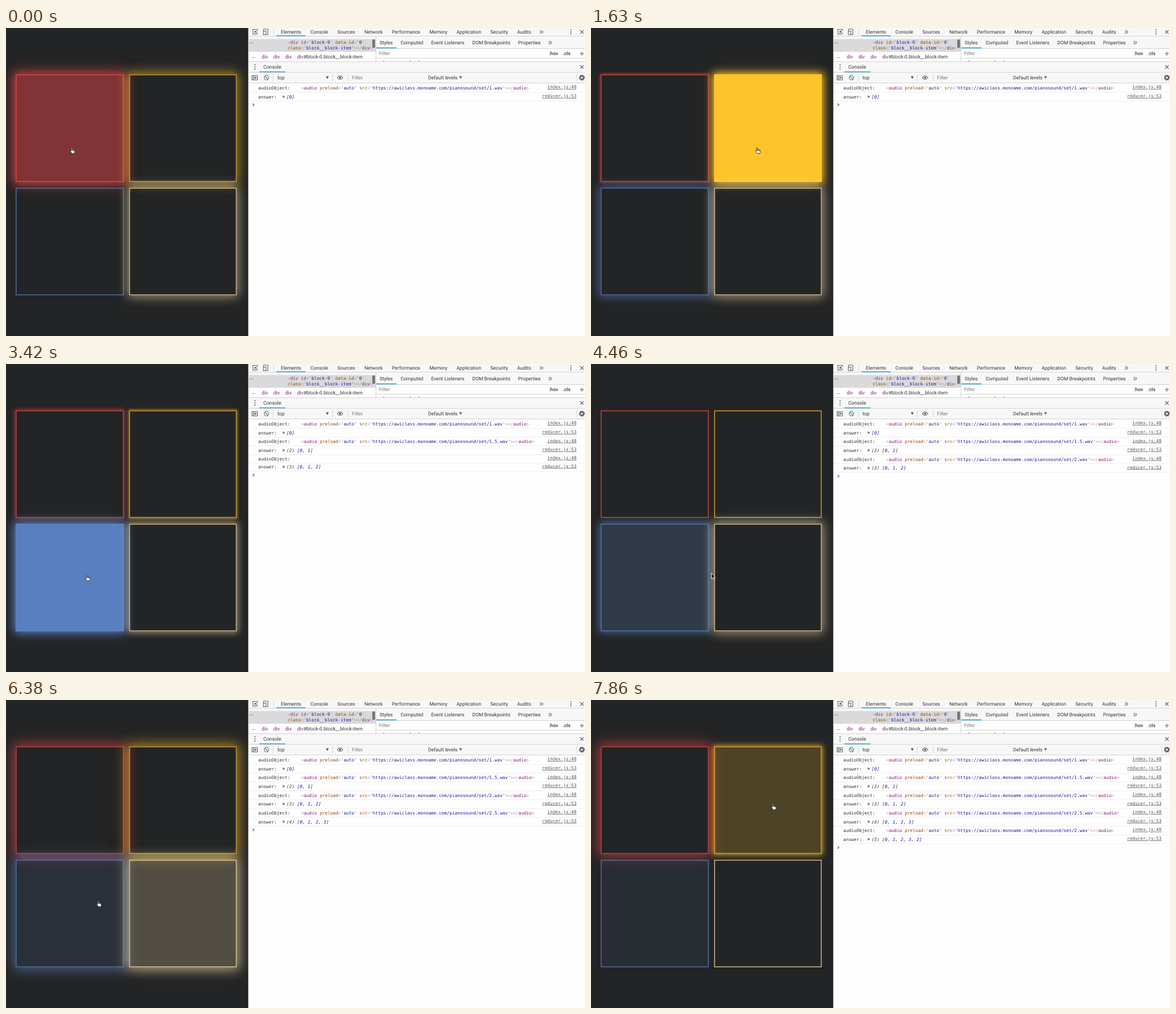
Animation of 1026x546 px, one loop 8000 ms. Source, as an HTML page:

```html
<!DOCTYPE html>
<html lang="en">
<head>
<meta charset="utf-8">
<title>Memory blocks</title>
<style>
  html, body { margin: 0; width: 100%; height: 100%; overflow: hidden; background: #232425; }
  #stage { position: relative; width: 1026px; height: 546px; overflow: hidden; background: #232425; }
  .block { position: absolute; box-sizing: border-box; height: 191px; border: 2px solid; }
  svg { position: absolute; left: 0; top: 0; text-rendering: geometricPrecision; }
  .ui { font: 8.7px Roboto, "Liberation Sans", sans-serif; fill: #333; }
  .mono { font: 7.8px "DejaVu Sans Mono", monospace; fill: #303030; white-space: pre; }
  .i { font-style: italic; }
  .m { font-weight: 500; }
  .p { fill: #a894a6; }
  .t { fill: #881280; }
  .a { fill: #994500; }
  .v { fill: #1a1aa6; }
  .n { fill: #1c00cf; }
  .dim { fill: #777; }
  .link { text-decoration: underline; text-anchor: end; fill: #545454; }
  .line { stroke: #d4d4d4; fill: none; }
  .icon { stroke: #5f6368; fill: none; stroke-width: 1.1; }
</style>
</head>
<body>
<div id="stage">
  <svg id="panel" width="1026" height="546">
    <rect x="429" width="597" height="546" fill="#fefefe"/>
    <g fill="#f7f7f7">
      <rect x="429" width="597" height="19.5"/>
      <rect x="656" y="14" width="370" height="22"/>
      <rect x="429" y="60" width="597" height="37"/>
    </g>
    <rect x="429" y="19.5" width="226" height="21.5" fill="#dadada"/>
    <rect x="649" y="20" width="5" height="15.5" rx="2.5" fill="#777"/>
    <path class="line" d="M429 14.5H1026M655.5 14.5V59M656 36.5H1026M656 53.5H1026M429 41.5H655M429 59.5H1026M429 78.5H1026M429 97.5H1026M474.5 2V12M473.5 82V94M578.5 82V94M606.5 82V94M1011.5 82V94"/>
    <path stroke="#2aa0dc" stroke-width="1.6" d="M479 13.8H531M656 35.3H692M449 77.7H495"/>
    <g class="icon">
      <path d="M444 11H437.5V2.5H446V5M441 5.5L446.5 11M441 9.5V5.5H445"/>
      <path d="M456.5 5V2H464V11.5H461M456 5.5H460.5V12H456Z"/>
      <path d="M1017.5 4L1023.5 10M1023.5 4L1017.5 10M1017.5 66L1023.5 72M1023.5 66L1017.5 72M1020.5 42V49M1017 45.5H1024"/>
      <path d="M436 84.5H445.5V92H436ZM438.3 84.5V92M440.8 86.4L443.6 88.2L440.8 90Z"/>
      <circle cx="461.5" cy="88" r="4"/><path d="M458.7 85.2L464.3 90.8"/>
      <path d="M587 88Q592 81.5 597 88Q592 94.5 587 88Z"/>
      <circle cx="1020.5" cy="88" r="3" stroke-width="2.4"/>
      <circle cx="1020.5" cy="88" r="4.6" stroke-width="1.6" stroke-dasharray="1.8 1.8"/>
      <path d="M946 4l2.5 3l-2.5 3m3 -6l2.5 3l-2.5 3M961.5 23l2.5 3l-2.5 3m3 -6l2.5 3l-2.5 3"/>
    </g>
    <g fill="#5f6368">
      <circle cx="592" cy="88" r="1.9"/>
      <path d="M566.5 85.5H572L569.3 90.5ZM803 85.5H808L805.5 90.5Z"/>
      <path id="dots" d="M1000 2.2h1.8v1.8h-1.8zm0 3.7h1.8v1.8h-1.8zm0 3.7h1.8v1.8h-1.8z"/>
      <use href="#dots" x="-559.5" y="62"/>
    </g>
    <g id="labels"></g>
    <clipPath id="cut"><rect x="656" y="54" width="370" height="5"/></clipPath>
    <text class="mono" x="663" y="63.5" clip-path="url(#cut)">element.style {</text>
    <g id="log"></g>
    <path id="prompt" d="M0 -2.3L2.6 0L0 2.3" fill="none" stroke="#3b79dc" stroke-width="1.3"/>
    <path d="M429.5 0V546" stroke="#bbb"/>
  </svg>
  <svg width="1026" height="546">
    <g id="hand" stroke="#111" stroke-width=".8" stroke-linejoin="round">
      <path fill="#fff" d="M-2.4 1V-4.4Q-1.6 -5.8 -.8 -4.4V-1.4Q.3 -2 .9 -1.1Q2 -1.6 2.5 -.6Q3.9 -.8 3.9 .8V2.8Q3.7 4 3 5.4H-1.4Q-2.2 3.6 -4 1.5Q-4.6 .2 -3.4 .1Z"/>
      <path fill="none" d="M-.8 -1.4V.8M.9 -1.1V.9M2.5 -.6V1"/>
    </g>
    <path id="arrow" fill="#111" stroke="#fff" stroke-width=".9"
      d="M0 -5V5L2.2 3L3.8 6.4L5.3 5.7L3.8 2.4H6.8Z"/>
  </svg>
</div>
<script>
const $ = id => document.getElementById(id);
const LOOP = 8000, FRAMES = 54, STEP = LOOP / FRAMES, ROW = 15.65;
const RISE = 320, HOLD = 150, FADE = 1150, MOVE = 800;
const clamp = u => Math.max(0, Math.min(1, u));
const smooth = u => u * u * (3 - 2 * u);

const span = (cls, s) => `<tspan class="${cls}">${s}</tspan>`;
const text = (cls, x, y, s) => `<text class="${cls}" x="${x}" y="${y}">${s}</text>`;
// A run of words with a fixed gap between them
const run = (cls, x, y, gap, words) =>
  text('ui ' + cls, x, y, words.map((w, i) => `<tspan dx="${i ? gap : 0}">${w}</tspan>`).join(''));

// Markup colouring for an element with attributes
const attr = (name, value) => span('a', name) + span('p', '="') + span('v', value) + span('p', '"');
const open = (name, ...attrs) => span('p', '&lt;') + span('t', name) + attrs.map(a => ' ' + a).join('');
const close = name => span('p', '&gt;&lt;/') + span('t', name) + span('p', '&gt;');

$('labels').innerHTML =
  run('', 487, 10, 16.3, ['Elements', 'Console', 'Sources', 'Network', 'Performance', 'Memory', 'Application', 'Security', 'Audits']) +
  run('', 662, 29, 13.9, ['Styles', 'Computed', 'Event Listeners', 'DOM Breakpoints', 'Properties']) +
  run('t', 453, 54, 9.8, ['div', 'div', 'div', 'div<tspan fill="#333">#block-0.block__block-item</tspan>']) +
  run('m', 962, 48, 9, [':hov', '.cls']) +
  text('ui dim', 661, 48, 'Filter') + text('ui dim', 613, 91, 'Filter') +
  text('ui m', 431, 27, '...') + text('ui m', 435, 53, '...') +
  text('ui', 456, 72, 'Console') + text('ui', 481, 91, 'top') + text('ui', 748, 91, 'Default levels') +
  text('mono', 499, 27.5, open('div', attr('id', 'block-0'), attr('data-id', '0'))) +
  text('mono', 499, 37.7, attr('class', 'block__block-item') + close('div'));

// Each block's glow breathes with its own period
const blocks = [
  { x: 17, y: 82, w: 192, rgb: '248,75,75', period: 1320, peak: 5130 },
  { x: 218, y: 82, w: 191, rgb: '255,196,42', period: 1225, peak: 5062 },
  { x: 17, y: 283, w: 192, rgb: '90,129,194', period: 2670, peak: 6525 },
  { x: 218, y: 283, w: 191, rgb: '255,232,174', period: 940, peak: 7390 }
];
for (const b of blocks) {
  b.el = document.createElement('div');
  b.el.className = 'block';
  b.el.style.cssText = `left:${b.x}px;top:${b.y}px;width:${b.w}px;border-color:rgba(${b.rgb},.58)`;
  $('stage').insertBefore(b.el, $('panel'));
}

// lit: block fully bright; log: console rows appear; ready: sound shown in its row
const presses = [
  { note: 0, lit: -800, log: -1 },
  { note: 1, lit: 1620, log: 1770 },
  { note: 2, lit: 3410, log: 3250, ready: 3550 },
  { note: 3, lit: 5320, log: 5030 },
  { note: 2, lit: 6650, log: 6660 },
  { note: 1, lit: 8110, log: 8260 }
];

// The pointer takes MOVE ms to reach each stop
const home = { x: 118, y: 217 };
const stops = [
  { start: 700, x: 296, y: 217 },
  { start: 2600, x: 145, y: 379 },
  { start: 4110, x: 326, y: 370 },
  { start: 5450, x: 165, y: 361 },
  { start: 7050, x: 324, y: 189 }
];

const link = s => text('mono link', 1011, 107.3, s);
const logged = presses.filter(p => p.log < LOOP);
$('log').innerHTML = logged.map(({ note }, i) => {
  const src = `https://awiclass.monoame.com/pianosound/set/${1 + note / 2}.wav`;
  const list = logged.slice(0, i + 1).map(p => span('n', p.note)).join(', ');
  const sound = open('audio', attr('preload', 'auto'), attr('src', src)) + close('audio');
  const sep = '<path d="M430 114H1026" stroke="#efefef"/>';
  return `<g>${text('mono', 447, 109, 'audioObject:')}<g class="sound">${text('mono', 523, 109, sound)}</g>
    ${link('index.js:48')}${sep}</g>
    <g>${text('mono', 447, 109, 'answer:')}<path d="M490.5 103.6L494.8 106L490.5 108.4Z" fill="#6e6e6e"/>
    ${text('mono i', 497, 109, (i ? `(${i + 1}) ` : '') + `[${list}]`)}${link('reducer.js:53')}${sep}</g>`;
}).join('');
const rows = [...$('log').children];

function drawLog(t) {
  let y = 0;
  rows.forEach((row, i) => {
    const press = logged[i >> 1], shown = t >= press.log, loading = t < press.ready;
    row.style.display = shown ? '' : 'none';
    if (!shown) return;
    if (loading) y -= 1; // rows sit tighter until the sound arrives
    row.setAttribute('transform', `translate(0 ${y})`);
    const sound = row.querySelector('.sound');
    if (sound) sound.style.display = loading ? 'none' : '';
    y += ROW;
  });
  $('prompt').setAttribute('transform', `translate(437 ${105 + y})`);
}

function fillOf(note, t) {
  const pulse = p => Math.min(clamp((t - p.lit) / RISE + 1), clamp(1 - (t - p.lit - HOLD) / FADE));
  return Math.max(...presses.filter(p => p.note === note).map(pulse));
}

function draw(t) {
  let { x, y } = home;
  for (const s of stops) {
    const u = smooth(clamp((t - s.start) / MOVE));
    x += (s.x - x) * u;
    y += (s.y - y) * u;
  }
  let over = false;
  blocks.forEach((b, note) => {
    const glow = .5 + .5 * Math.cos(2 * Math.PI * (t - b.peak) / b.period);
    const fill = fillOf(note, t);
    b.el.style.backgroundColor = `rgba(${b.rgb},${fill})`;
    b.el.style.boxShadow = `0 0 ${22 * glow}px ${4 * glow}px rgba(${b.rgb},${.6 + .4 * fill})`;
    over = over || (x > b.x && x < b.x + b.w && y > b.y && y < b.y + 191);
  });
  for (const id of ['hand', 'arrow']) {
    $(id).style.display = (id === 'hand') === over ? '' : 'none';
    $(id).setAttribute('transform', `translate(${x} ${y})`);
  }
  drawLog(t);
}

function tick(now) {
  // Stepped like a screen recording
  const k = Math.min(FRAMES - 1, Math.floor((now % LOOP + 10) / STEP));
  draw(k * STEP);
  requestAnimationFrame(tick);
}
tick(performance.now());
</script>
</body>
</html>
```
